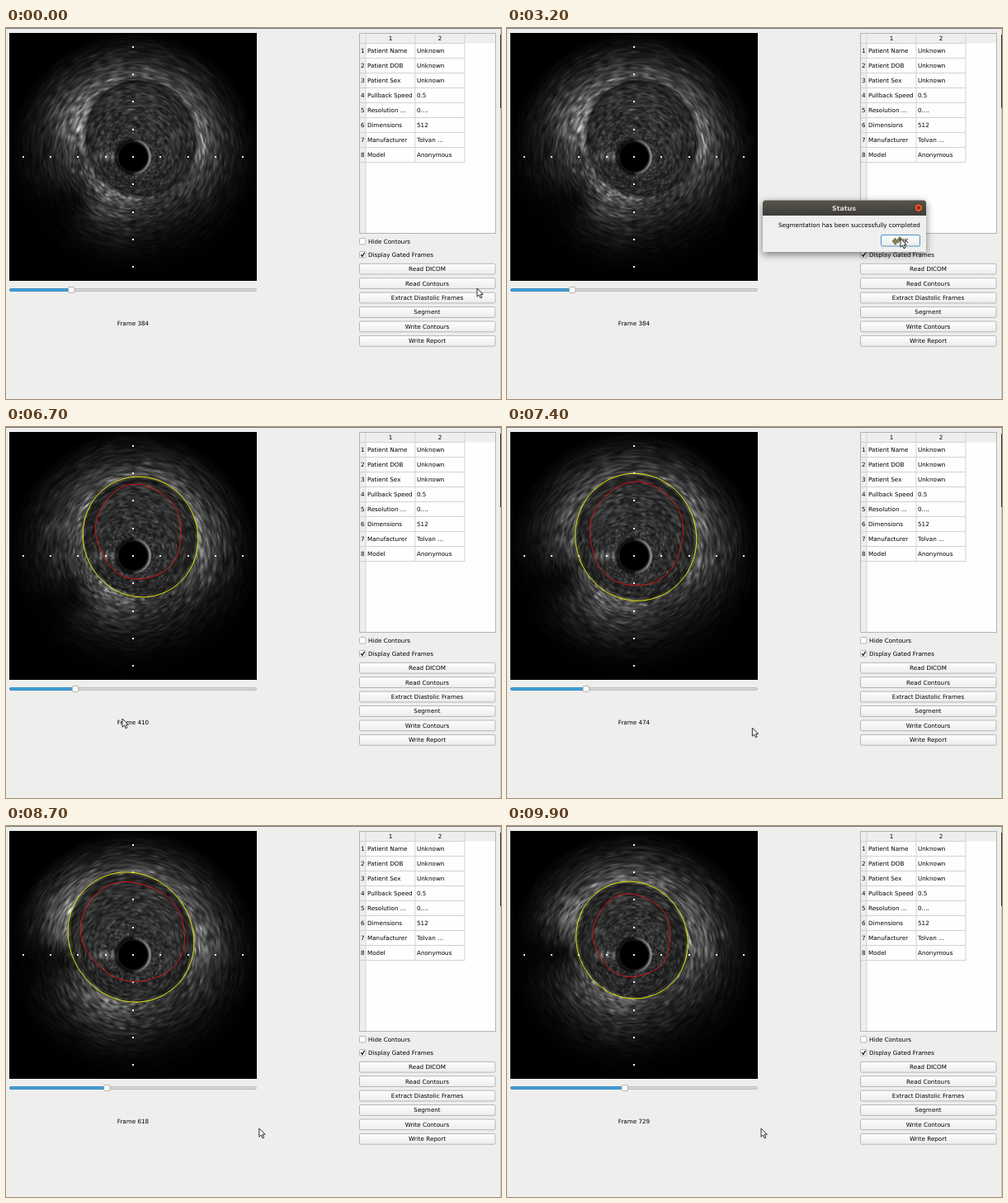
Animation, 600 px wide and 449 px high, one loop 10000 ms. Source, as an HTML page with a canvas:

```html
<!DOCTYPE html>
<html lang="en">
<head>
<meta charset="utf-8">
<title>Ultrasound segmentation viewer</title>
<style>
html, body { margin: 0; width: 100%; height: 100%; overflow: hidden; background: #eeeeed; }
canvas { position: absolute; left: 4px; top: 6px; }
svg { position: absolute; left: 0; top: 0; }
text { font: 7.2px "DejaVu Sans", sans-serif; fill: #000; text-rendering: geometricPrecision; }
.mid { text-anchor: middle; }
.title { font-size: 7.9px; font-weight: bold; fill: #e4e0d8; }
.line { stroke: #d2d2d2; fill: none; }
.box { fill: #fefefc; stroke: #b4b4b4; }
.button { fill: url(#face); stroke: #b5b5b5; }
.contour { fill: none; stroke-width: 1; }
#dialog { filter: drop-shadow(0 3px 5px rgba(0, 0, 0, .5)); }
</style>
</head>
<body>
<canvas id="scan" width="300" height="300"></canvas>
<svg width="600" height="449" viewBox="0 0 600 449">
  <defs>
    <linearGradient id="face" x2="0" y2="1"><stop stop-color="#fefefe"/><stop offset="1" stop-color="#ececeb"/></linearGradient>
    <linearGradient id="bar" x2="0" y2="1"><stop stop-color="#57554e"/><stop offset="1" stop-color="#3c3b37"/></linearGradient>
  </defs>
  <path d="M0 .5H600" stroke="#777"/>
  <path d="M599.5 1V449" stroke="#c9c9c8"/>
  <path d="M599.5 8V97" stroke="#2c2c2c"/>
  <g id="panel"></g>
  <g id="dots" fill="#f4f4f4"></g>
  <path id="outer" class="contour" stroke="#e8e800"/>
  <path id="inner" class="contour" stroke="#d81418"/>
  <rect x="4.5" y="315.5" width="299" height="3" rx="1.5" fill="#d6d6d6" stroke="#b2b2b2" stroke-width=".8"/>
  <rect id="fill" x="4.5" y="315.5" height="3" rx="1.5" fill="#3f9fdc" stroke="#2f7fb4" stroke-width=".8"/>
  <rect id="handle" y="313.5" width="7.5" height="7" rx="1.5" fill="#fafafa" stroke="#a5a5a5" stroke-width=".8"/>
  <text id="label" class="mid" x="154" y="359.6"></text>
  <g id="dialog">
    <path d="M310 271V212q0-3.5 3.5-3.5H504.500q3.5 0 3.5 3.5V271Z" fill="#efefee"/>
    <path d="M310 227V212q0-3.5 3.5-3.5H504.500q3.5 0 3.5 3.5V227Z" fill="url(#bar)"/>
    <text class="mid title" x="408.5" y="220.7">Status</text>
    <circle cx="499" cy="217.6" r="4.9" fill="#e9582f" stroke="#33302b" stroke-width=".8"/>
    <path d="M497.200 215.800l3.600 3.600m0-3.600l-3.600 3.600" stroke="#4a2013" stroke-width="1.1"/>
    <text x="329" y="240.7">Segmentation has been successfully completed</text>
    <rect class="button" x="453.5" y="250.5" width="47" height="13.5" rx="1.5" style="stroke:#4d94bd"/>
    <path d="M467 258l4-4v2.500h2l3-4 1.500 1.500-3.500 6h-3v2.500Z" fill="#8c8a4c" stroke="#4d4d2a" stroke-width=".7"/>
    <text x="476" y="260">OK</text>
  </g>
  <path id="cursor" d="M0 0V10.200L2.400 8 4.100 11.800 5.900 11 4.200 7.300H7.300Z" fill="#f6f6f6" stroke="#1c1c1c" stroke-width=".9" stroke-linejoin="round"/>
</svg>
<script>
const $ = id => document.getElementById(id);
const TAU = Math.PI * 2, RAD = Math.PI / 180;
const LOOP = 10000, STEP = 100;
const CX = 154, CY = 156, FIRST = 384;

// Time, then values; linear between entries.
const CURSOR = [
  [2600, 571, 315], [3200, 477, 255], [3700, 477, 255], [4100, 320, 315], [4200, 320, 315],
  [5100, 83, 318], [6200, 80, 318], [6700, 141, 353], [7200, 284, 360], [7500, 304, 366], [9200, 308, 366]
];
const FRAME = [[6400, FIRST], [6500, 410], [6700, 410], [8000, 529], [8700, 618], [9900, 729]];
const DIALOG = [[1400, 0], [1500, .35], [1700, 1], [3700, 1], [4000, 0]];

// Frame number, then an oval: centre x, centre y, radius, stretch, tilt in degrees.
const OUTER = [[410, 163, 133, 71.3, 2, 70], [529, 150.5, 133.5, 78.5, 2, 80], [618, 151.5, 134.5, 77.3, 3.2, 55], [729, 151.5, 138, 69.2, 2.5, 65]];
const INNER = [[410, 161, 127, 54.5, 3, 80], [529, 153.5, 132, 64, 3.5, 105], [618, 154, 128, 61.5, 3, 30], [729, 151.5, 132.5, 48.5, 1.8, 75]];
// Frame number, then brightness of the upper left flank and angle of the acoustic shadow.
const ECHO = [[FIRST, 65, 145], [410, 5, 148], [529, 15, 175], [618, 65, 175], [729, 35, 180]];

function track(keys, at) {
  const next = keys.findIndex(k => k[0] > at);
  if (next === 0) return keys[0].slice(1);
  if (next < 0) return keys[keys.length - 1].slice(1);
  const a = keys[next - 1], b = keys[next], f = (at - a[0]) / (b[0] - a[0]);
  return a.slice(1).map((v, i) => v + (b[i + 1] - v) * f);
}

const clamp = v => Math.max(0, Math.min(1, v));
const bell = v => Math.exp(-v * v);
const lobe = (angle, mid, spread) => bell(((angle / RAD - mid + 900) % 360 - 180) / spread);

const radiusAt = ([, , radius, stretch, tilt], angle) => radius + stretch * Math.cos(2 * (angle - tilt * RAD));

function outline(oval, wobble) {
  const points = Array.from({ length: 120 }, (_, i) => {
    const a = i / 120 * TAU, r = radiusAt(oval, a) + wobble * Math.sin(5 * a + oval[2]);
    return (oval[0] + r * Math.cos(a)).toFixed(1) + " " + (oval[1] + r * Math.sin(a)).toFixed(1);
  });
  return "M" + points.join("L") + "Z";
}

// Distance from the oval's centre, where 1 lies on its edge.
function reach(oval, x, y) {
  const dx = x - oval[0], dy = y - oval[1];
  return Math.hypot(dx, dy) / radiusAt(oval, Math.atan2(dy, dx));
}

function randomFrom(seed) {
  let state = seed * 7919 + 17;
  return () => {
    state = (state + 0x6D2B79F5) | 0;
    let v = Math.imul(state ^ state >>> 15, state | 1);
    v ^= v + Math.imul(v ^ v >>> 7, v | 61);
    return ((v ^ v >>> 14) >>> 0) / 4294967296;
  };
}

// Speckle lives on a polar grid, so grains stretch along the arc.
function makeSpeckle(seed) {
  const spokes = 84, rings = 100, random = randomFrom(seed);
  const grid = Float32Array.from({ length: spokes * rings }, () => Math.sqrt(-Math.log(1 - random())));
  return (r, angle) => {
    const u = ((angle / TAU + 1) % 1) * spokes, v = r / 1.8;
    const i = Math.floor(u), j = Math.floor(v), fu = u - i, fv = v - j;
    const at = (p, q) => grid[q * spokes + p % spokes];
    const near = at(i, j) * (1 - fu) + at(i + 1, j) * fu;
    const far = at(i, j + 1) * (1 - fu) + at(i + 1, j + 1) * fu;
    return .3 + .8 * (near * (1 - fv) + far * fv);
  };
}

// The vessel rim is brightest below and decays outward; the lumen stays dim.
function tissue(x, y, r, angle, outer, inner, [flank, shadow]) {
  const edge = reach(outer, x, y);
  const inside = reach(inner, x, y) < 1 ? 48 : edge > .92 ? 32 : 40;
  const rim = 50 + 60 * lobe(angle, 115, 40) + flank * lobe(angle, 212, 22) + 35 * lobe(angle, -10, 35);
  const field = rim * Math.exp(-1.8 * Math.max(0, edge - 1)) + 18 - 22 * Math.sin(angle);
  const shade = 1 - .75 * lobe(angle, shadow, 16) * clamp((r - 60) / 25);
  const outside = Math.max(4, field) * shade * clamp((152 - r) / 60);
  return inside + (outside - inside) * clamp((edge - .94) / .08);
}

function catheter(dx, dy, r, angle) {
  const bars = .6 + .4 * Math.cos((r - 25) * .9);
  const ringdown = 75 * bars * bell(dy / 5) * clamp((-dx - 17) / 6) * clamp((56 + dx) / 16);
  const sheath = 130 * bell((r - 20.5) / 1.6) * Math.sqrt(Math.max(0, Math.cos(angle)));
  return ringdown + sheath + 22 * bell((r - 18.5) / 1.2);
}

const pen = $("scan").getContext("2d");
const picture = pen.createImageData(300, 300);

function paintScan(frame, outer, inner) {
  const echo = track(ECHO, frame), speckle = makeSpeckle(frame);
  for (let n = 0; n < 90000; n++) {
    const x = n % 300 + 4.5, y = Math.floor(n / 300) + 6.5;
    const dx = x - CX, dy = y - CY, r = Math.hypot(dx, dy), angle = Math.atan2(dy, dx);
    let light = 0;
    if (r > 17 && r < 152) {
      light = tissue(x, y, r, angle, outer, inner, echo) * speckle(r, angle) * clamp((r - 19) / 5)
        + catheter(dx, dy, r, angle);
    }
    picture.data.fill(Math.min(225, light), n * 4, n * 4 + 3);
    picture.data[n * 4 + 3] = 255;
  }
  pen.putImageData(picture, 0, 0);
}

function buildPanel() {
  const rows = [
    ["Patient Name", "Unknown"], ["Patient DOB", "Unknown"], ["Patient Sex", "Unknown"],
    ["Pullback Speed", "0.5"], ["Resolution ...", "0...."], ["Dimensions", "512"],
    ["Manufacturer", "Tolvan ..."], ["Model", "Anonymous"]
  ];
  const buttons = ["Read DICOM", "Read Contours", "Extract Diastolic Frames", "Segment", "Write Contours", "Write Report"];
  const text = (x, y, s, mid) => `<text x="${x}" y="${y}"${mid ? ' class="mid"' : ""}>${s}</text>`;
  let html = `<rect class="box" x="428.5" y="6.5" width="165" height="242"/>
    <path d="M429 7H593V18.500H436V248H429Z" fill="#eeeeed"/>
    <path class="line" d="M429 18.500H556M436 7V248M496 7V162.500M556 7V162.500"/>`;
  html += text(466, 15.2, 1, true) + text(526, 15.2, 2, true);
  rows.forEach(([name, value], i) => {
    const y = 18.5 + i * 18;
    html += `<path class="line" d="M429 ${y + 18}H556"/>`
      + text(432.2, y + 11.2, i + 1, true) + text(438, y + 11.2, name) + text(498, y + 11.2, value);
  });
  ["Hide Contours", "Display Gated Frames"].forEach((name, i) => {
    const y = 254.5 + i * 16;
    html += `<rect class="box" x="428.5" y="${y}" width="7.5" height="7.5" rx="1"/>` + text(439, y + 6.7, name);
  });
  html += '<path d="M430.200 274.200l1.700 2.200 2.700-4.700" fill="none" stroke="#111" stroke-width="1.3"/>';
  buttons.forEach((name, i) => {
    const y = 285.3 + i * 17.42;
    html += `<rect class="button" x="428.5" y="${y}" width="164.5" height="12.8" rx="1.5"/>` + text(510.5, y + 8.9, name, true);
  });
  $("panel").innerHTML = html;
}

function buildDots() {
  const dot = (x, y) => `<rect x="${Math.round(x - 1)}" y="${Math.round(y - 1)}" width="2" height="2"/>`;
  let html = "";
  for (let d = -4 * 33.3; d < 150; d += 33.3) html += dot(CX + d, CY) + dot(CX, CY + d);
  $("dots").innerHTML = html;
}

let shownFrame = -1;

function showFrame(frame) {
  if (frame === shownFrame) return;
  shownFrame = frame;
  const outer = track(OUTER, frame), inner = track(INNER, frame);
  paintScan(frame, outer, inner);
  const segmented = frame > FIRST;
  $("outer").setAttribute("d", segmented ? outline(outer, 0) : "");
  $("inner").setAttribute("d", segmented ? outline(inner, .8) : "");
  const x = 79.5 + (frame - FIRST) * .184;
  $("fill").setAttribute("width", x - 5);
  $("handle").setAttribute("x", x - 4);
  $("label").textContent = "Frame " + frame;
}

function draw(now) {
  const t = Math.floor(now % LOOP / STEP) * STEP;
  showFrame(Math.round(track(FRAME, t)[0]));
  const [opacity] = track(DIALOG, t);
  $("dialog").style.opacity = opacity;
  $("dialog").style.display = opacity ? "" : "none";
  $("cursor").setAttribute("transform", `translate(${track(CURSOR, t)})`);
  requestAnimationFrame(draw);
}

buildPanel();
buildDots();
draw(performance.now());
</script>
</body>
</html>
```
